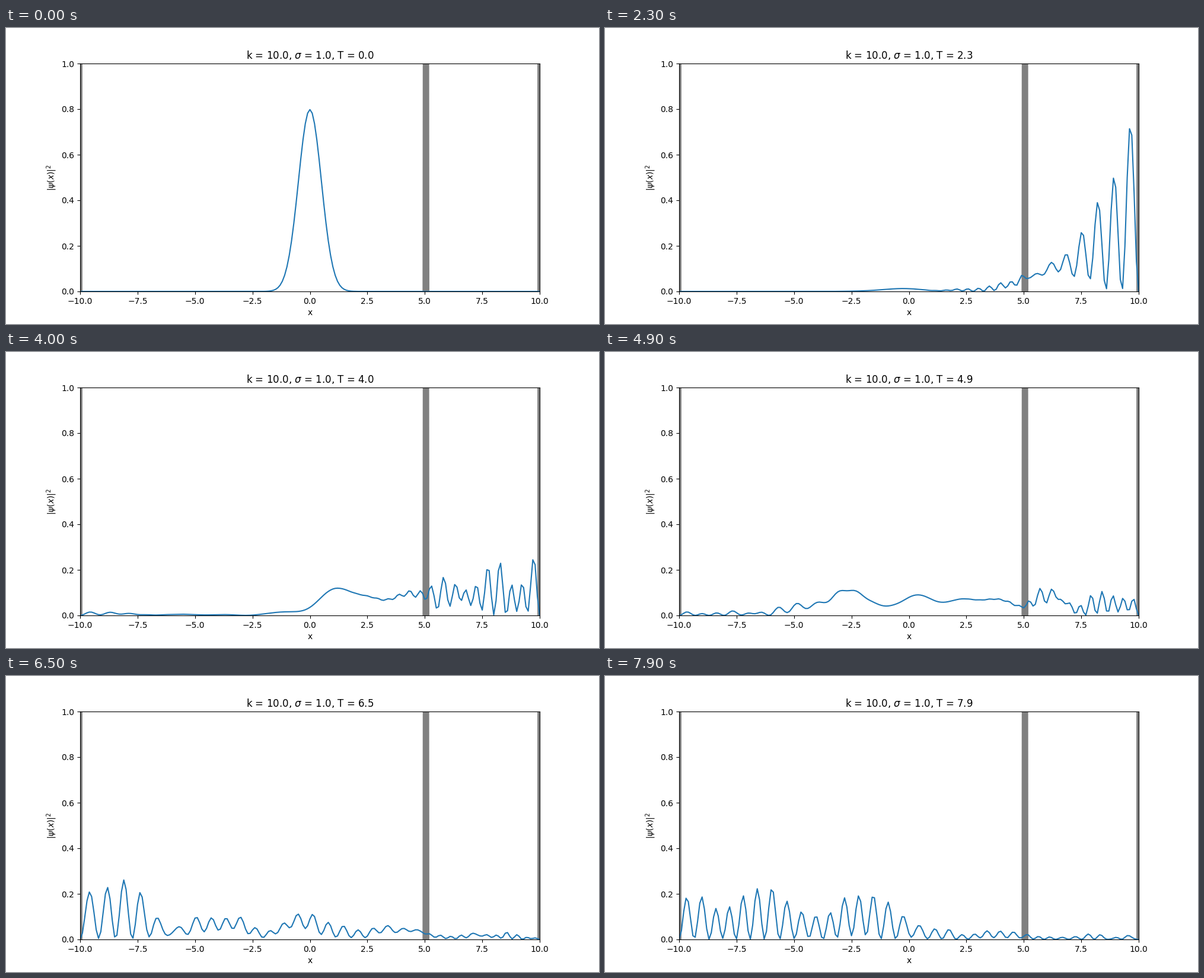
A matplotlib script for the animation above (8000 ms loop, 1000 px wide and 500 px high).

```python
import numpy as np
import matplotlib.pyplot as plt
from matplotlib.animation import FuncAnimation

K, SIGMA = 10.0, 1.0
DX, DT = 0.1, 0.1
FRAMES = 80
BARRIER, WALL = 10.0, 1e6

x = np.linspace(-10, 10, 201)
n = len(x)

# Potential: hard walls at both ends, a thin barrier near x = 5
V = np.zeros(n)
V[[0, -1]] = WALL
V[(x > 4.95) & (x < 5.15)] = BARRIER

# H = -d2/dx2 + V, advanced with the Crank-Nicolson scheme
hop = np.ones(n - 1) / DX**2
H = np.diag(2 / DX**2 + V) - np.diag(hop, 1) - np.diag(hop, -1)
A = 0.5j * DT * H
step = np.linalg.solve(np.eye(n) + A, np.eye(n) - A)


def evolve():
    psi = (2 / (np.pi * SIGMA**2)) ** 0.25 * np.exp(-(x / SIGMA) ** 2 + 0.5j * K * x)
    out = []
    for _ in range(FRAMES):
        out.append(np.abs(psi) ** 2)
        psi = step @ psi
    return out


density = evolve()

fig, ax = plt.subplots(figsize=(10, 5), dpi=100)
ax.fill_between(x, V, color="gray", linewidth=0)
line, = ax.plot(x, density[0], color="C0")
ax.set_xlim(-10, 10)
ax.set_ylim(0, 1)
ax.set_xlabel("x")
ax.set_ylabel(r"$|\psi(x)|^2$")
title = ax.set_title("")


def update(i):
    line.set_ydata(density[i])
    title.set_text(rf"k = {K:.1f}, $\sigma$ = {SIGMA:.1f}, T = {i * DT:.1f}")
    return line, title


anim = FuncAnimation(fig, update, frames=FRAMES, interval=100,
                     init_func=lambda: update(0), repeat=True, repeat_delay=0)
plt.show()
```
